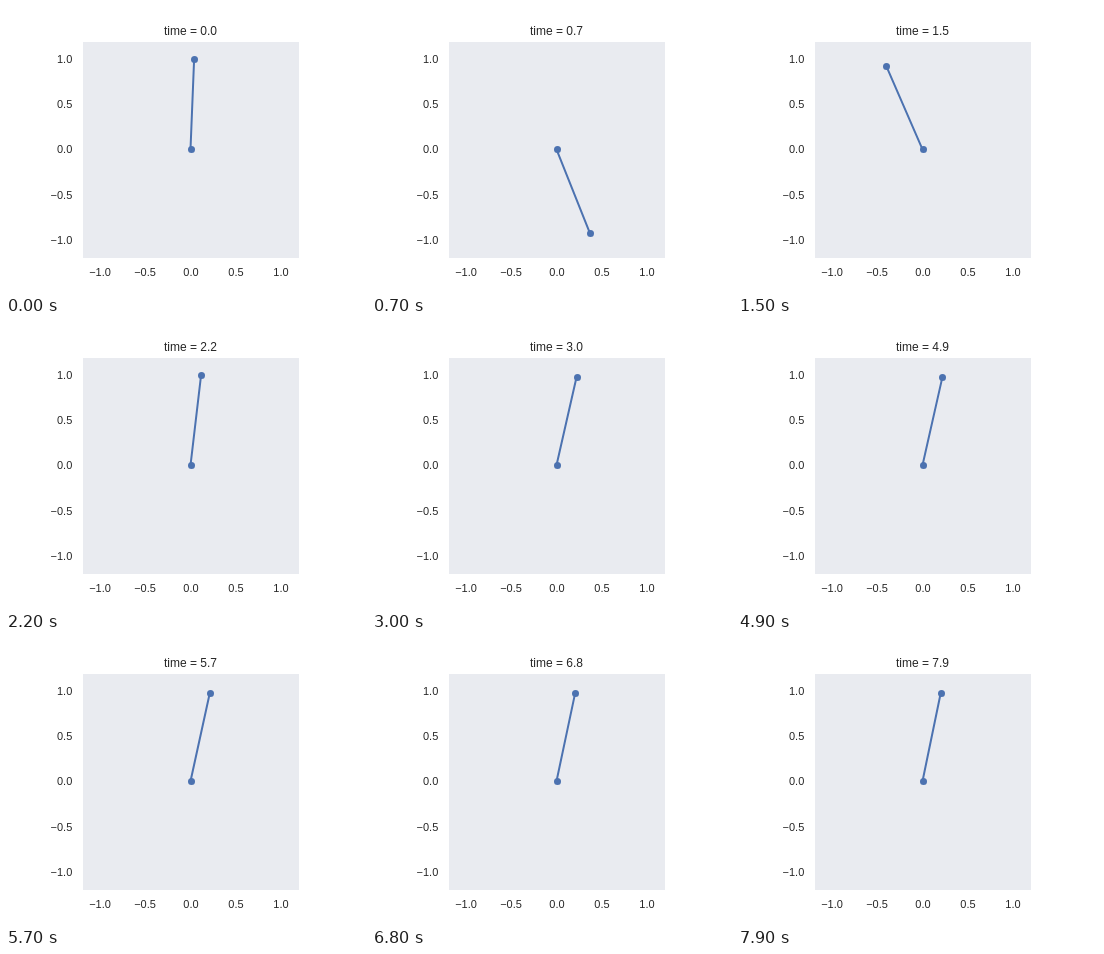
Animation, 360 px wide and 288 px high, one loop 8 s. Source, as an HTML page:

```html
<!DOCTYPE html>
<html lang="en">
<head>
<meta charset="utf-8">
<title>Pendulum</title>
<style>
  html, body { margin: 0; width: 100%; height: 100%; overflow: hidden; background: #fff; }
  svg { display: block; width: 360px; height: 288px; }
  text { font: 11px "Liberation Sans", Arial, sans-serif; fill: #262626; }
  #title { font-size: 12px; }
</style>
</head>
<body>
<svg viewBox="0 0 360 288">
  <rect x="77" y="36" width="216" height="216" fill="#e9ebf0"/>
  <text id="title" x="184.5" y="29" text-anchor="middle">time = 0.0</text>
  <g id="ticks"></g>
  <line id="rod" stroke="#4c72b0" stroke-width="2" stroke-linecap="round"/>
  <g fill="#4c72b0">
    <circle id="pivot" r="3.5"/>
    <circle id="bob" r="3.5"/>
  </g>
</svg>
<script>
  const STEP = 100, COUNT = 80;
  const CX = 184.5, CY = 143.28, UNIT = 90.6;

  const $ = id => document.getElementById(id);
  const setAll = (el, attrs) => {
    for (const key in attrs) el.setAttribute(key, attrs[key]);
  };

  function addLabel(text, x, y, anchor) {
    const el = document.createElementNS("http://www.w3.org/2000/svg", "text");
    setAll(el, { x, y, "text-anchor": anchor });
    el.textContent = text;
    $("ticks").append(el);
  }

  for (let v = -1; v <= 1; v += 0.5) {
    const label = v.toFixed(1).replace("-", "\u2212");
    addLabel(label, Math.round(CX + v * UNIT), 270, "middle");
    addLabel(label, 66.3, Math.round(CY - v * UNIT + 4), "end");
  }

  // Degrees clockwise from upright: an accelerating fall past the bottom,
  // then a damped rise to just beyond the top with a slow drift back.
  function angleAt(t) {
    if (t < 0.85) return 2.3 + 279 * t ** 1.63;
    const rest = 371.1 + 3.2 * Math.exp(-0.35 * (t - 3));
    return rest - 149 * Math.exp(-2.19 * (t - 0.9));
  }

  // Markers snap to pixel centres; the rod does not.
  const snap = v => Math.round(v) + 0.5;
  const placeMarker = (el, x, y) => setAll(el, { cx: snap(x), cy: snap(y) });

  function draw(t) {
    const a = angleAt(t) * Math.PI / 180;
    const x = CX + UNIT * Math.sin(a), y = CY - UNIT * Math.cos(a);
    setAll($("rod"), { x1: CX, y1: CY, x2: x, y2: y });
    placeMarker($("bob"), x, y);
    $("title").textContent = "time = " + t.toFixed(1);
  }

  let start = null, shown = -1;
  function tick(now) {
    if (start === null) start = now;
    const step = Math.floor((now - start) / STEP) % COUNT;
    if (step !== shown) draw((shown = step) / 10);
    requestAnimationFrame(tick);
  }

  placeMarker($("pivot"), CX, CY);
  draw(0);
  requestAnimationFrame(tick);
</script>
</body>
</html>
```
